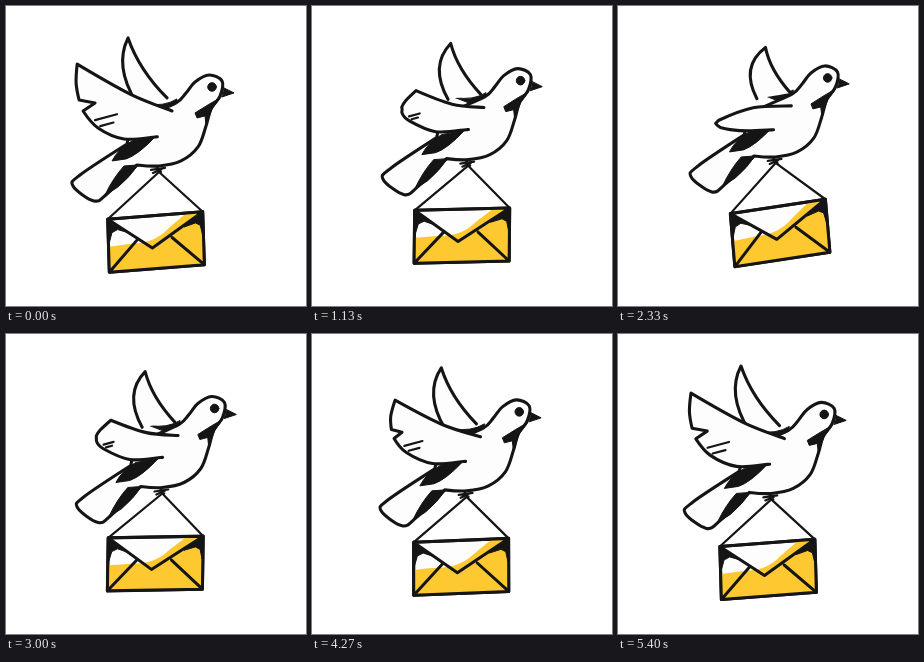
An HTML page for the animation above (5430 ms loop, 300 px wide and 300 px high).

```html
<!DOCTYPE html>
<html lang="en">
<head>
<meta charset="utf-8">
<title>Carrier dove</title>
<style>
html, body { margin: 0; width: 100%; height: 100%; overflow: hidden; background: #fff; }
svg { display: block; width: 100vw; height: 100vh; stroke-linejoin: round; stroke-linecap: round; }
.line { fill: none; stroke: #151515; stroke-width: 3; }
.skin { fill: #fdfdfd; stroke: #151515; stroke-width: 3.1; }
.ink { fill: #151515; stroke: #151515; stroke-width: 1; }
.gold { fill: #fdc830; }
.thin { stroke-width: 2.2; }
</style>
</head>
<body>
<svg viewBox="0 0 300 300">
  <path id="cord" class="line thin"/>
  <path id="paper" class="skin"/>
  <path id="gold" class="gold"/>
  <path id="shade" class="ink"/>
  <path id="folds" class="line"/>
  <g id="bird">
    <path class="line thin" d="M145 164L159 162M147 167L156 163M150 160L155 166"/>
    <path class="ink" d="M140 98Q158 101 171 93L167 108Z"/>
    <path id="rear" class="skin"/>
    <path id="body" class="skin"/>
    <path class="ink" d="M99 189Q107 172 118 160L132 159Q124 171 112 181Z"/>
    <path class="ink" d="M149 131L126 135Q112 143 106 155L120 153Q132 149 149 131Z"/>
    <path class="ink" d="M214 92Q203 98 189 107L191 112L199 110L200 119L206 103Z"/>
    <path id="wing" class="skin"/>
    <path id="feathers" class="line thin"/>
    <path class="ink" d="M218 82L228 87L216 91Z"/>
    <circle class="ink" cx="206" cy="81" r="4.3"/>
  </g>
</svg>
<script>
const LOOP = 5430, BEAT = 34;

const $ = id => document.getElementById(id);
const set = (id, d) => $(id).setAttribute('d', d);
const parse = text => text.trim().split(/\s+/).map(p => p.split(',').map(Number));
const lerp = (a, b, k) => a + (b - a) * k;
const mix = (p, q, k) => p.map((v, i) => lerp(v, q[i], k));
const blend = (a, b, k) => a.map((p, i) => mix(p, b[i], k));
const poly = pts => 'M' + pts.join('L');

// Smooth curve through points; listed corners stay sharp.
function curve(pts, closed, corners = []) {
  const n = pts.length;
  const at = i => closed ? pts[(i + n) % n] : pts[Math.max(0, Math.min(n - 1, i))];
  const slope = i => corners.includes(i % n) ? [0, 0]
    : at(i + 1).map((v, j) => (v - at(i - 1)[j]) / 6);
  let d = 'M' + pts[0];
  for (let i = 0; i < n - !closed; i++) {
    const out = slope(i), into = slope(i + 1);
    d += 'C' + [at(i).map((v, j) => v + out[j]), at(i + 1).map((v, j) => v - into[j]), at(i + 1)];
  }
  return d + (closed ? 'Z' : '');
}

set('body', curve(parse(`170,97 180,87 189,76 203,69 216,75 214,90 205,103 200,120 192,141
  175,155 153,160 131,159 102,187 88,195 67,180 74,169 121,138 127,120 141,110`), true, [11, 16]));

// Near wing at four stages of the stroke; short rows repeat their last point.
const STAGES = [0, 0.32, 0.68, 1];
const wings = [
  '166,105 124,88 71,58 70,77 73,94 89,97 77,105 92,122 118,133 149,131',
  '169,108 137,105 101,92 90,102 86,108 86,110 86,113 93,121 120,132 151,130',
  '169,109 130,111 95,124 93,126 92,127 94,129 97,131 107,133 125,134 149,133',
  '141,110 113,120 90,132 89,136 92,142 98,148 115,157 118,149 119,139 120,133 127,120 141,110'
].map(parse);
for (const w of wings) while (w.length < 12) w.push(w[w.length - 1]);

function drawWing(s) {
  const i = s < STAGES[1] ? 0 : s < STAGES[2] ? 1 : 2;
  const w = blend(wings[i], wings[i + 1], (s - STAGES[i]) / (STAGES[i + 1] - STAGES[i]));
  set('wing', curve(w, false, [2, 4, 5, 6]));
  const reach = 22 - 36 * s;
  const barb = (along, len) => {
    const [x, y] = mix(w[6], w[7], along);
    return poly([[x + 3, y - 1], [x + 3 + len, y - 1 - len * 0.27]]);
  };
  set('feathers', reach > 0 ? barb(0.6, reach) + barb(0.95, reach * 0.6) : '');
}

// Far wing: base, bulge, tip, hollow, base.
const raised = parse('130,96 108,60 122,32 133,64 161,92');
const folded = parse('139,109 128,82 169,74 165,84 177,101');

function drawRear(k) {
  const [a, b, tip, c, d] = blend(raised, folded, k ** 1.25);
  set('rear', `M${a}Q${b} ${tip}Q${c} ${d}`);
}

// Swing of the letter over one beat: tick, slope in degrees, sideways offset.
const swing = parse('0,-4.5,-3 7,-1,-7 16,-13.5,2 24,-8.6,4.5 27,-1.2,-6.5 34,-4.5,-3');

function drawLetter(tick, knot) {
  const i = swing.findLastIndex(key => key[0] <= tick);
  const k = (tick - swing[i][0]) / (swing[i + 1][0] - swing[i][0]);
  const [, slope, offset] = mix(swing[i], swing[i + 1], (1 - Math.cos(Math.PI * k)) / 2);
  const rise = 95 * Math.tan(slope * Math.PI / 180), lean = -0.7 * slope - 1.5;
  const at = ([u, v]) => [
    knot[0] + offset + (u - 0.5) * 95 + (v - 0.5) * lean,
    knot[1] + 70 + (u - 0.5) * rise + (v - 0.5) * 53
  ];
  const spots = text => parse(text).map(at);
  const corners = spots('0,0 1,0 1,1 0,1');
  set('cord', poly([corners[0], knot, corners[1]]));
  set('paper', poly(corners) + 'Z');
  set('gold', curve(spots('0,.52 .2,.5 .4,.48 .55,.38 .68,.2 .83,0 1,0 1,1 0,1'), true, [0, 5, 6, 7, 8]));
  set('shade', ['0,0 .22,.29 .1,.21 .04,.26 .01,.44', '1,0 .8,.26 .92,.2 .97,.25 .99,.42']
    .map(t => poly(spots(t)) + 'Z').join(''));
  set('folds', poly(corners) + 'Z' +
    ['0,0 .46,.61 1,0', '0,1 .31,.42', '1,1 .67,.44'].map(t => poly(spots(t))).join(''));
}

function draw(tick) {
  const s = (1 - Math.cos(2 * Math.PI * (tick - 0.4) / BEAT)) / 2;
  // The body lingers halfway while the wings keep moving.
  const lift = lerp(4 * (s - 0.5) ** 3 + 0.5, s, 0.35) - 0.25 * s * (1 - s);
  const squeeze = 1 - 0.035 * lift;
  const place = ([x, y]) => [150 + (x - 150) * squeeze + 9 * lift, y - 17.5 * lift];
  const [x, y] = place([0, 0]);
  $('bird').setAttribute('transform', `matrix(${squeeze} 0 0 1 ${x} ${y})`);
  drawWing(s);
  drawRear(lift);
  drawLetter(tick, place([153, 166]));
}

// Five drawings per six ticks of 1/30 s; the first of each five is held twice.
function run() {
  const slot = Math.floor((performance.now() % LOOP + 4) * 0.03);
  draw((5 * Math.floor(slot / 6) + Math.max(0, slot % 6 - 1)) % BEAT);
  requestAnimationFrame(run);
}
run();
</script>
</body>
</html>
```
